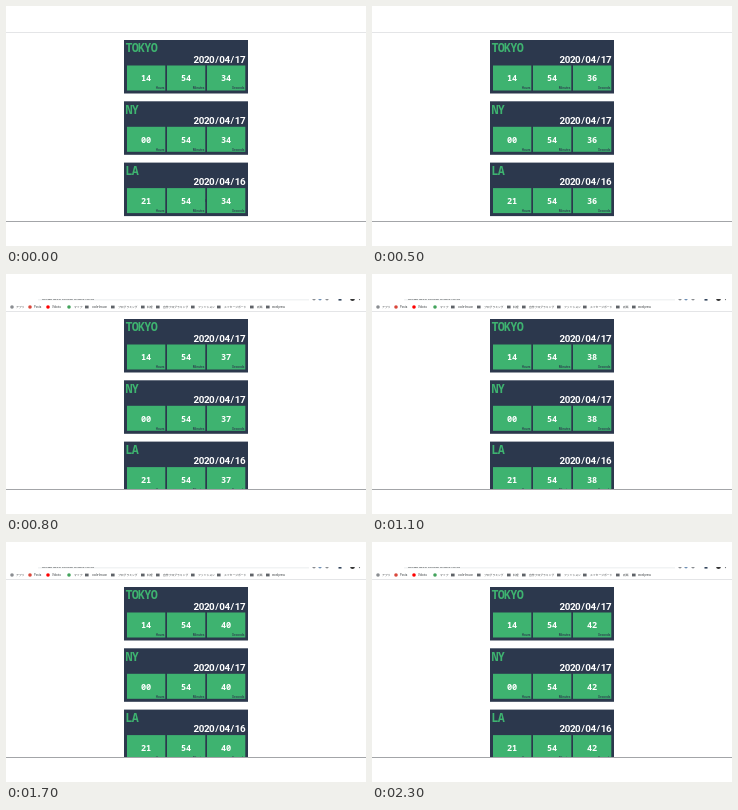
Write an HTML page with a canvas that moves like this. It is 360 by 240 pixels and loops after 2400 ms.

```html
<!DOCTYPE html>
<html lang="ja">
<head>
<meta charset="utf-8">
<style>
html, body { margin: 0; width: 100%; height: 100%; overflow: hidden; background: #fff; }
canvas { display: block; width: 360px; height: 240px; }
</style>
</head>
<body>
<canvas id="stage"></canvas>
<script>
const LOOP = 2400, SCROLL_AT = 600, TICK = 300, FIRST_SECOND = 34;
const NAVY = '#2c384d', GREEN = '#3eb370', GREY = '#5f6368';
const MONO = '"Noto Sans Mono", monospace';
const SMALL = 'Roboto, "Noto Sans CJK JP", "Noto Sans CJK", sans-serif';

const canvas = document.getElementById('stage');
const ctx = canvas.getContext('2d');
const ratio = window.devicePixelRatio || 1;
canvas.width = 360 * ratio;
canvas.height = 240 * ratio;
ctx.scale(ratio, ratio);

const clocks = [
  ['TOKYO', '2020/04/17', '14'],
  ['NY', '2020/04/17', '00'],
  ['LA', '2020/04/16', '21']
];
const units = ['Hours', 'Minutes', 'Seconds'];

// icon x, label x, label, icon colour (folders have none)
const bookmarks = [
  [4, 10, 'アプリ', '#8a8d91'],
  [22, 28, 'Posta', '#d9473b'],
  [40, 46, 'Vidoria', '#f00'],
  [61, 68, 'マップ', '#43a35c'],
  [79, 86, 'code-lesson'],
  [105, 112, 'プログラミング'],
  [135, 141, '料理'],
  [150, 157, '自作プログラミング'],
  [185, 192, 'ファッション'],
  [211, 218, 'メッセージボード'],
  [244, 251, '就職'],
  [260, 266, 'wordpress']
];

function rect(x, y, w, h, color) {
  ctx.fillStyle = color;
  ctx.fillRect(x, y, w, h);
}

function dot(x, y, r, color) {
  ctx.fillStyle = color;
  ctx.beginPath();
  ctx.arc(x, y, r, 0, 7);
  ctx.fill();
}

function text(str, x, y, font, color, align = 'left') {
  ctx.font = font;
  ctx.fillStyle = color;
  ctx.textAlign = align;
  ctx.fillText(str, x, y);
}

// Evenly pitched characters, the first one centred on x
function spaced(str, x, y, pitch, font, color) {
  [...str].forEach((ch, i) => text(ch, x + i * pitch, y, font, color, 'center'));
}

function card([city, date, hour], y, second) {
  rect(118, y, 124, 53.5, NAVY);
  spaced(city, 123, y + 12.4, 6.3, 'bold condensed 11.8px ' + MONO, GREEN);
  spaced(date, 190.4, y + 22.6, 5.15, 'bold condensed 9.8px Roboto, sans-serif', '#fff');
  [hour, '54', String(second)].forEach((value, i) => {
    const x = 121 + 40 * i;
    rect(x, y + 25.5, 38.3, 25, GREEN);
    spaced(value, x + 16.7, y + 41.4, 4.8, 'bold 8.6px ' + MONO, '#fff');
    text(units[i], x + 37.4, y + 49.4, '500 3.2px Roboto, sans-serif', NAVY, 'right');
  });
}

function toolbar() {
  ctx.save();
  ctx.beginPath();
  ctx.rect(0, 25, 360, 20);
  ctx.clip();
  rect(32, 25, 271, 1.5, '#f1f3f4');
  text('localhost/clock/index.html', 36, 26.3, '4.4px ' + SMALL, '#3c4043');
  dot(308, 24.8, 1.7, '#8a8d91');
  dot(314, 24.8, 1.7, '#6e8fb5');
  dot(321, 24.8, 1.7, '#8a8d91');
  rect(332.5, 24, 3, 2.6, '#34465e');
  dot(346.5, 24.6, 2.4, '#333');
  dot(353.5, 25.6, 0.6, GREY);
  bookmarks.forEach(([ix, tx, label, color]) => {
    if (color) dot(ix + 2, 33, 1.8, color);
    else rect(ix, 31.6, 3.6, 2.8, GREY);
    text(label, tx, 34.2, '2.8px ' + SMALL, '#3c4043');
  });
  rect(0, 37, 360, 1, '#e4e5e7');
  ctx.restore();
}

function draw(time) {
  const t = time % LOOP;
  const scrolled = t >= SCROLL_AT;
  const second = FIRST_SECOND + Math.floor((t + TICK / 2) / TICK);
  rect(0, 0, 360, 240, '#fff');

  ctx.save();
  ctx.beginPath();
  ctx.rect(0, 26, 360, 189);
  ctx.clip();
  clocks.forEach((clock, i) => card(clock, (scrolled ? 45 : 34) + 61.3 * i, second));
  ctx.restore();

  if (scrolled) toolbar();
  else rect(0, 26, 360, 1, '#e4e5e7');
  if (t < 300) rect(199.5, 193, 1, 3, NAVY);
  rect(0, 215, 360, 1, '#a3a5a8');
}

const start = performance.now();
function frame() {
  draw(performance.now() - start);
  requestAnimationFrame(frame);
}
frame();
</script>
</body>
</html>
```
